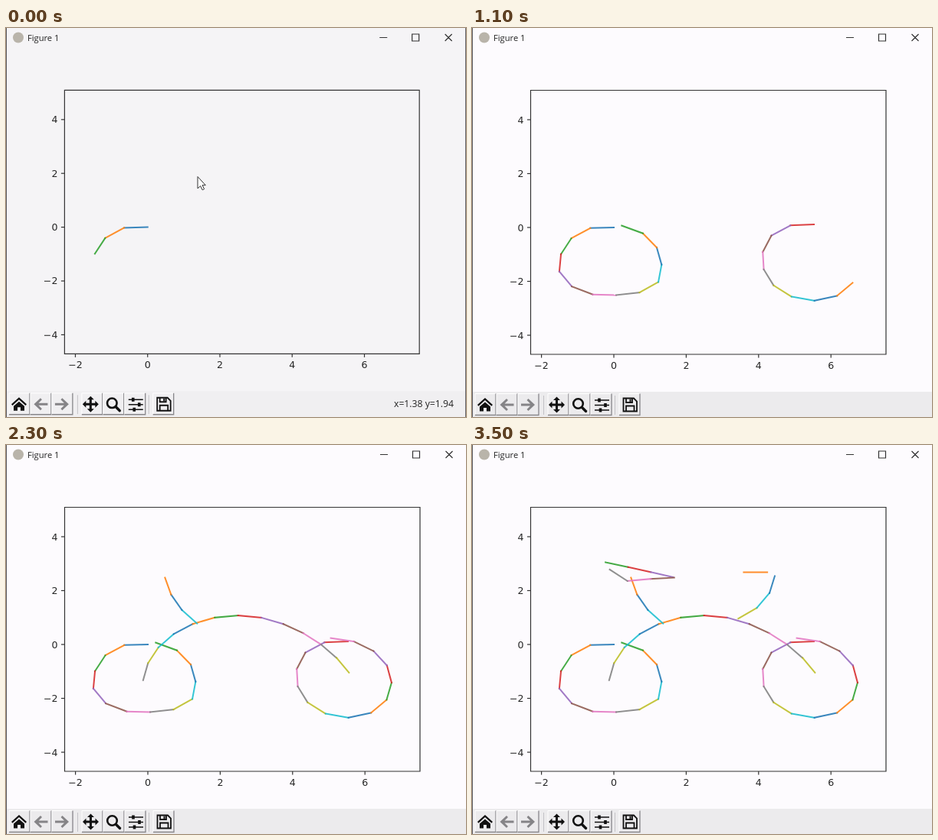
An HTML page for the animation above (4000 ms loop, 600 px wide and 509 px high).

```html
<!DOCTYPE html>
<html lang="en">
<head>
<meta charset="utf-8">
<title>Figure 1</title>
<style>
  html, body { margin: 0; width: 100%; height: 100%; overflow: hidden; }
  svg { display: block; width: 600px; height: 509px; background: #fdfbfe; }
  svg.start { background: #f5f4f6; }
  .start #window { transform: scale(.9985); }
  .start #bar { fill: #f0eff1; }
  #hover { visibility: hidden; }
  .start #hover { visibility: visible; }
  .ui { font: 11.2px "Open Sans", "Noto Sans", sans-serif; fill: #222; }
  .tick { font: 12.6px "DejaVu Sans", sans-serif; fill: #262626; }
  .line { fill: none; stroke: #333; stroke-width: 1.2; }
  .seg { stroke-width: 2; stroke-linecap: square; stroke-opacity: .88; }
</style>
</head>
<body>
<svg viewBox="0 0 600 509">
  <g id="window">
    <rect id="bar" y="476" width="600" height="35" fill="#ecebed"/>
    <path d="M.5 0v511M600.5 0v511" stroke="#55545a"/>
    <circle cx="16" cy="12.5" r="7" fill="#b9b4aa"/>
    <text class="ui" x="28" y="17">Figure 1</text>
    <path class="line" d="M488 12.5h10M530.5 8h9v9h-9zM573.5 8l9 9m0-9l-9 9"/>

    <g id="axes"><path class="line" d="M76.500 81.500h463.500v345.500h-463.500z"/></g>
    <g id="drawing"></g>
    <g id="buttons"></g>

    <g fill="#111">
      <path d="M17 484l10 9-1.500 1.700L17 487l-8.500 7.700L7 493zM17 489.500l7 6v6h-5v-4.500h-4v4.500h-5v-6z"/>
      <path id="arrow" fill="#858487" d="M36.500 493l8.500-8 2 2-4.500 4.500h12v3h-12l4.500 4.500-2 2z"/>
      <use href="#arrow" transform="matrix(-1 0 0 1 118.500 0)"/>
    </g>
    <g id="move" transform="translate(110.500 493)"></g>
    <g fill="none" stroke="#111">
      <circle cx="138.500" cy="491.500" r="6.300" stroke-width="2.600"/>
      <path d="M143.500 496.500l5 5" stroke-width="3.400" stroke-linecap="round"/>
      <path d="M160 487h19M160 493.500h19M160 500h19" stroke-width="1.700"/>
      <path d="M166 484.500v5M174 491v5M167.500 497.500v5" stroke-width="3.600"/>
      <path d="M197.500 484.500h13.500l4 4v13h-17.500zM201 501v-6.500h10.500v6.500M201 485v5h8v-5" stroke-width="1.800"/>
      <path d="M206.500 485.500v3.500" stroke-width="2"/>
    </g>
  </g>

  <g id="hover">
    <path d="M250 194.500v15.500l3.600-3.300 2.600 5.200 2.400-1.200-2.500-5h4.200z" fill="#fff" stroke="#333"/>
    <text class="ui" x="506" y="496" style="font-size: 12.2px">x=1.38 y=1.94</text>
  </g>
</svg>
<script>
const LOOP = 4000, STEP = 100;
const FIRST = 3.8, RATE = 5 / 3;       // arms at the start, arms added per step
const ARM = 0.65;                      // every arm has this length in plot units
const UNIT_X = 47.2, UNIT_Y = 35.25;   // pixels per plot unit
const COLORS = ["#1f77b4", "#ff7f0e", "#2ca02c", "#d62728", "#9467bd",
                "#8c564b", "#e377c2", "#7f7f7f", "#bcbd22", "#17becf"];

const $ = id => document.getElementById(id);
const root = document.querySelector("svg");

function add(parent, tag, attrs, text) {
  const el = document.createElementNS(root.namespaceURI, tag);
  for (const key in attrs) el.setAttribute(key, attrs[key]);
  if (text !== undefined) el.textContent = text;
  parent.append(el);
  return el;
}

const toX = x => 185 + x * UNIT_X;
const toY = y => 261 - y * UNIT_Y;
const label = n => String(n).replace("-", "\u2212");

for (let n = -2; n <= 6; n += 2) {
  add($("axes"), "path", { class: "line", d: `M${toX(n)} 427v4.5` });
  add($("axes"), "text", { class: "tick", x: toX(n), y: 445.5, "text-anchor": "middle" }, label(n));
}
for (let n = -4; n <= 4; n += 2) {
  add($("axes"), "path", { class: "line", d: `M72 ${toY(n)}h4.5` });
  add($("axes"), "text", { class: "tick", x: 67.5, y: toY(n) + 4.5, "text-anchor": "end" }, label(n));
}

function buttonGroup(left, count) {
  for (let i = 0; i < count; i++) {
    const x = left + 28 * i;
    add($("buttons"), "path", { d: `M${x} 506v-27.5h27`, fill: "none", stroke: "#fff" });
    add($("buttons"), "path", { d: `M${x} 506.5h27v-28`, fill: "none", stroke: "#87868a", "stroke-width": 1.3 });
  }
  if (left > 4) add($("buttons"), "path", { d: `M${left - 5.5} 481v25`, stroke: "#c3c2c6" });
}
buttonGroup(4, 3);
buttonGroup(99, 3);
buttonGroup(192, 1);

for (let turn = 0; turn < 360; turn += 90) {
  add($("move"), "path", { d: "M-1.5 0v-6h-3l4.5-4.5 4.5 4.5h-3v6z", fill: "#111", transform: `rotate(${turn})` });
}

// Value at position t (0 to 1) along evenly spaced keys
function along(keys, t) {
  const at = t * (keys.length - 1);
  const i = Math.min(Math.floor(at), keys.length - 2);
  return keys[i] + (keys[i + 1] - keys[i]) * (at - i);
}

// A chain of equal arms whose heading (clockwise degrees) bends through the keys
const arms = [];
function stroke(x, y, count, ...headings) {
  for (let i = 0; i < count; i++) {
    const angle = along(headings, i / (count - 1 || 1)) * Math.PI / 180;
    const x2 = x + ARM * Math.cos(angle), y2 = y - ARM * Math.sin(angle);
    arms.push(add($("drawing"), "line", {
      class: "seg", x1: toX(x), y1: toY(y), x2: toX(x2), y2: toY(y2),
      stroke: COLORS[arms.length % COLORS.length]
    }));
    [x, y] = [x2, y2];
  }
}

stroke(0, 0, 13, 178, 127, 94, 40, 2, -14, -82, -112, -154);    // left wheel
stroke(5.53, 0.11, 14, 177, 106, 58, 0, -70, -121, -169);       // right wheel
stroke(-0.13, -1.33, 12, -78, -26, 26, 58);                     // frame
stroke(1.36, 0.78, 3, -130, -105);                              // seat post
stroke(-0.23, 3.05, 3, 16, 17);                                 // saddle top
stroke(1.67, 2.48, 3, 176, 173, 221);                           // saddle base
stroke(3.44, 0.96, 3, -38, -77);                                // stem
stroke(3.59, 2.68, 1, 0, 0);                                    // handlebar

function draw() {
  const step = Math.floor(performance.now() % LOOP / STEP);
  const shown = Math.floor(FIRST + step * RATE);
  arms.forEach((arm, i) => arm.style.display = i < shown ? "" : "none");
  root.classList.toggle("start", step === 0);
  requestAnimationFrame(draw);
}
draw();
</script>
</body>
</html>
```
